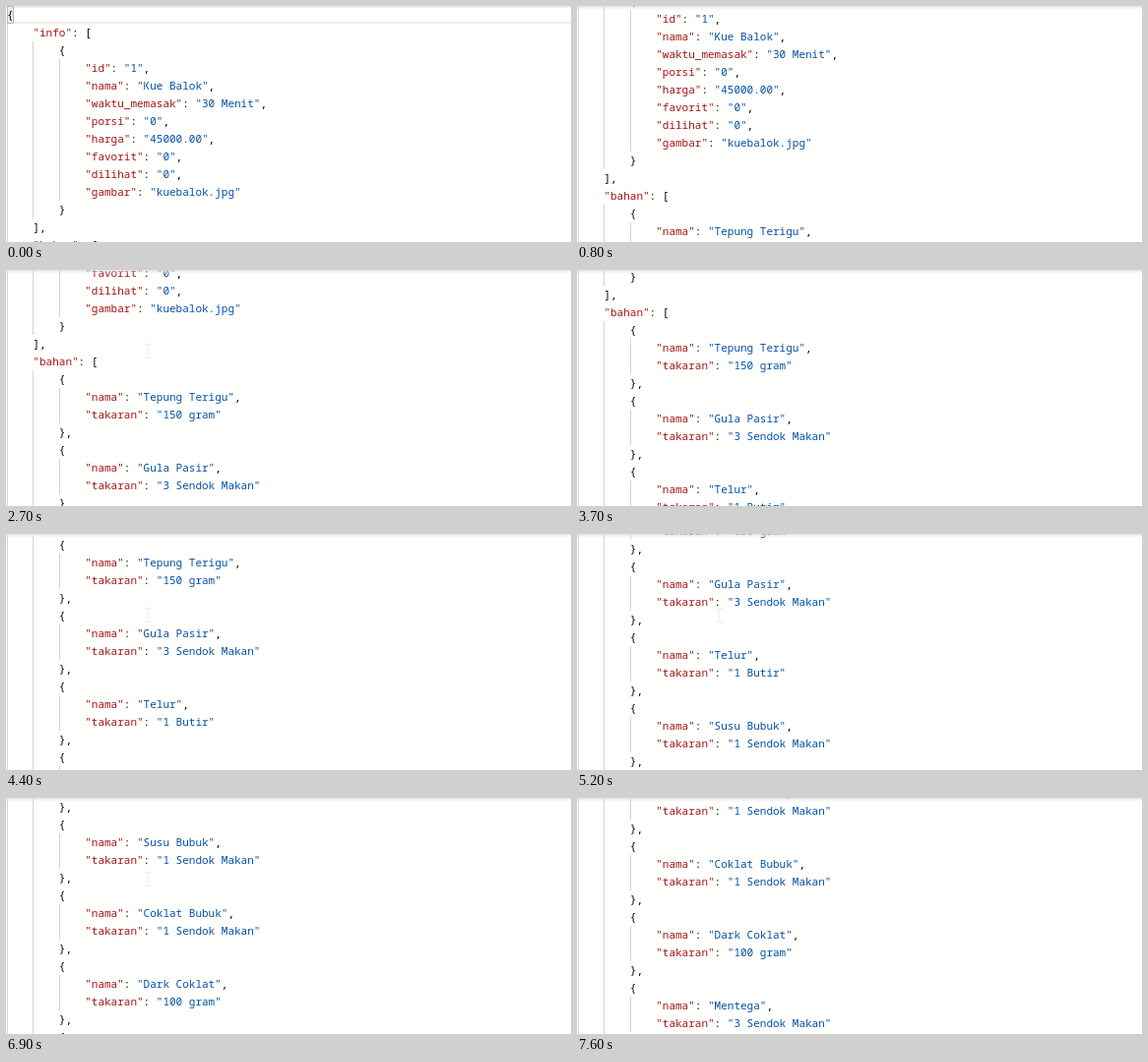
Write an HTML page that moves like this. It is 574 by 240 pixels and loops after 8 s.

```html
<!DOCTYPE html>
<html lang="id">
<head>
<meta charset="utf-8">
<style>
  html, body { margin: 0; width: 574px; height: 240px; overflow: hidden; background: #fffffe; }
  svg { display: block; }
  text { font: 11px "Noto Sans Mono", "DejaVu Sans Mono", monospace; white-space: pre; }
  .key { fill: #a31515; }
  .str { fill: #0451a5; }
</style>
</head>
<body>
<svg width="574" height="240">
  <defs>
    <linearGradient id="fade" x2="0" y2="1">
      <stop stop-color="#ddd" stop-opacity=".75"/>
      <stop offset="1" stop-color="#ddd" stop-opacity="0"/>
    </linearGradient>
  </defs>
  <g id="doc" shape-rendering="crispEdges">
    <path d="M0 1H574M0 17H574" stroke="#eee" stroke-width="2"/>
    <rect x="1.5" y=".5" width="6" height="17" fill="#e5f0e5" stroke="#b9b9b9"/>
  </g>
  <path id="beam" d="M141 75.5h3m1 0h3M144.5 76v13M141 89.5h3m1 0h3" fill="none" stroke="#ececec"/>
  <path id="glint" d="M141.5 77v8" stroke="#fff" stroke-opacity=".6"/>
  <rect id="shadow" width="574" height="4" fill="url(#fade)"/>
</svg>
<script>
const LINE = 18, CHAR = 6.6, LOOP = 8000;
const $ = id => document.getElementById(id);

const data = {
  info: [{
    id: "1", nama: "Kue Balok", waktu_memasak: "30 Menit", porsi: "0",
    harga: "45000.00", favorit: "0", dilihat: "0", gambar: "kuebalok.jpg"
  }],
  bahan: [
    ["Tepung Terigu", "150 gram"],
    ["Gula Pasir", "3 Sendok Makan"],
    ["Telur", "1 Butir"],
    ["Susu Bubuk", "1 Sendok Makan"],
    ["Coklat Bubuk", "1 Sendok Makan"],
    ["Dark Coklat", "100 gram"],
    ["Mentega", "3 Sendok Makan"]
  ].map(([nama, takaran]) => ({ nama, takaran }))
};

function add(parent, tag, attrs, text = "") {
  const el = document.createElementNS("http://www.w3.org/2000/svg", tag);
  for (const name in attrs) el.setAttribute(name, attrs[name]);
  el.textContent = text;
  return parent.appendChild(el);
}

JSON.stringify(data, null, 4).split("\n").forEach((line, row) => {
  const body = line.trimStart();
  const level = (line.length - body.length) / 4;
  for (let i = 0; i < level; i++)
    add($("doc"), "rect", { x: [1, 27, 54][i], y: row * LINE, width: 1, height: LINE, fill: "#d3d3d3" });
  const text = add($("doc"), "text", { x: 1 + level * 4 * CHAR, y: row * LINE + 13 });
  const parts = body.match(/"[^"]*"|[^"]+/g);
  parts.forEach((part, i) => {
    const kind = part[0] != '"' ? "" : i ? "str" : "key";
    add(text, "tspan", { class: kind }, part);
  });
});

// [start time, scroll offset]
const steps = [
  [0, 0], [800, 50], [1700, 100], [2600, 125], [2700, 150], [3700, 200],
  [4400, 250], [5200, 300], [5800, 350], [6400, 400], [6900, 450], [7600, 500]
];
const beamAt = [150, 250, 300, 400, 450];   // offsets with blank space under the pointer

function draw(now) {
  const t = now % LOOP;
  const scroll = steps.findLast(step => step[0] <= t)[1];
  const show = (id, on) => $(id).setAttribute("visibility", on ? "visible" : "hidden");
  $("doc").setAttribute("transform", `translate(0 ${-scroll})`);
  show("shadow", scroll > 0);
  show("beam", beamAt.includes(scroll));
  show("glint", t < 100);
}

const start = performance.now();
function tick() {
  draw(performance.now() - start);
  requestAnimationFrame(tick);
}
tick();
</script>
</body>
</html>
```
